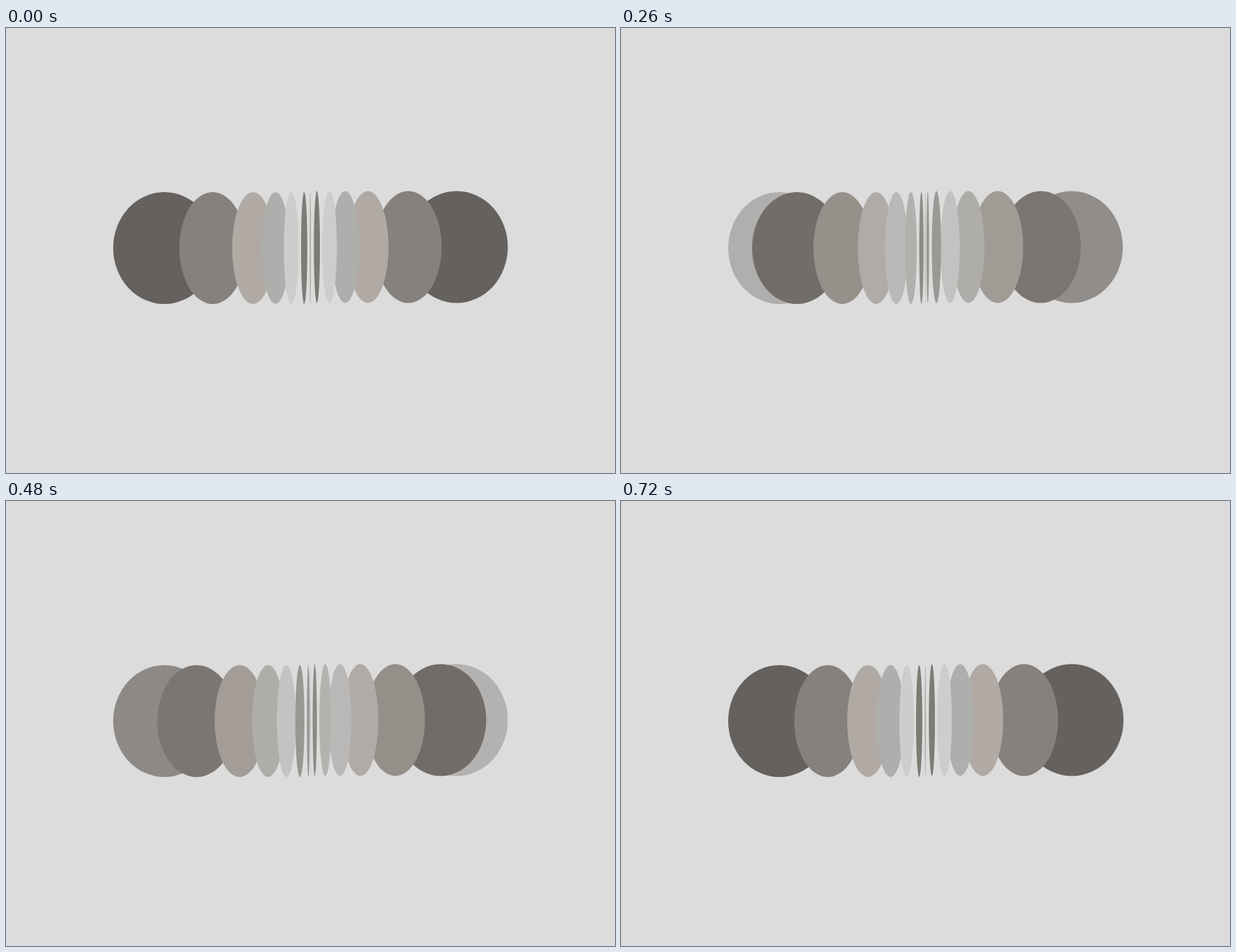
An HTML page for the animation above (820 ms loop, 875 by 640 pixels).

```html
<!DOCTYPE html>
<html lang="en">
<head>
<meta charset="utf-8">
<title>Spinning discs</title>
<style>
  html, body { margin: 0; width: 100%; height: 100%; overflow: hidden; background: #dcdcdc; }
  svg { display: block; width: 875px; height: 640px; }
  :root {
    --a: #65615e; --b: #86817c; --c: #b1aaa4; --d: #aeaead;
    --e: #cecdcb; --f: #7b7d75; --g: #a6a6a2;
  }
  ellipse {
    cx: var(--x0); rx: var(--r0); ry: 80.5px; fill: var(--c0);
    animation: 820ms steps(36) infinite;
  }
  .left { cy: 316.5px; }
  .right { cy: 315px; }
  .move { animation-name: move; }
  .in { animation-name: in; }
  .out { animation-name: out; }

  /* 720 ms of motion, then a 100 ms hold */
  @keyframes move {
    0% { cx: var(--x0); rx: var(--r0); fill: var(--c0); }
    87.8%, 100% { cx: var(--x1); rx: var(--r1); fill: var(--c1); }
  }
  @keyframes in {
    0% { opacity: 0; }
    87.8%, 100% { opacity: 1; }
  }
  @keyframes out {
    0% { opacity: 1; }
    87.8%, 100% { opacity: 0; }
  }
</style>
</head>
<body>
<svg id="stage" viewBox="0 0 875 640"></svg>
<script>
  const stage = document.getElementById('stage');

  function disc(side, kind, from, to = from) {
    const el = document.createElementNS('http://www.w3.org/2000/svg', 'ellipse');
    el.setAttribute('class', side + ' ' + kind);
    [from, to].forEach(([x, r, color], i) => {
      el.style.setProperty('--x' + i, x + 'px');
      el.style.setProperty('--r' + i, r + 'px');
      el.style.setProperty('--c' + i, `var(--${color})`);
    });
    stage.append(el);
  }

  // Each disc: centre, half width, colour; outer discs lie below inner ones
  disc('left', 'in', [227.5, 73.5, 'a']);
  disc('left', 'move', [227.5, 73.5, 'a'], [297, 48, 'b']);
  disc('left', 'move', [297, 48, 'b'], [355, 30, 'c']);
  disc('left', 'move', [355, 30, 'c'], [387.3, 19.8, 'd']);
  disc('left', 'move', [387.3, 19.8, 'd'], [410.5, 10.5, 'e']);
  disc('left', 'move', [409.9, 10.7, 'e'], [428.4, 4.5, 'f']);
  disc('left', 'move', [428.4, 4.5, 'f'], [437.3, 0.8, 'g']);
  disc('left', 'out', [437.3, 0.8, 'g']);

  disc('right', 'out', [647.5, 73.5, 'a']);
  disc('right', 'move', [578, 48, 'b'], [647.8, 74.2, 'a']);
  disc('right', 'move', [520, 29.6, 'c'], [579, 49, 'b']);
  disc('right', 'move', [487.4, 19.6, 'd'], [520, 29.1, 'c']);
  disc('right', 'move', [464.7, 10.7, 'e'], [487.4, 19.6, 'd']);
  disc('right', 'move', [446.7, 4.4, 'f'], [464.7, 10.7, 'e']);
  disc('right', 'move', [437.5, 0.4, 'g'], [446.7, 4.4, 'f']);
</script>
</body>
</html>
```
